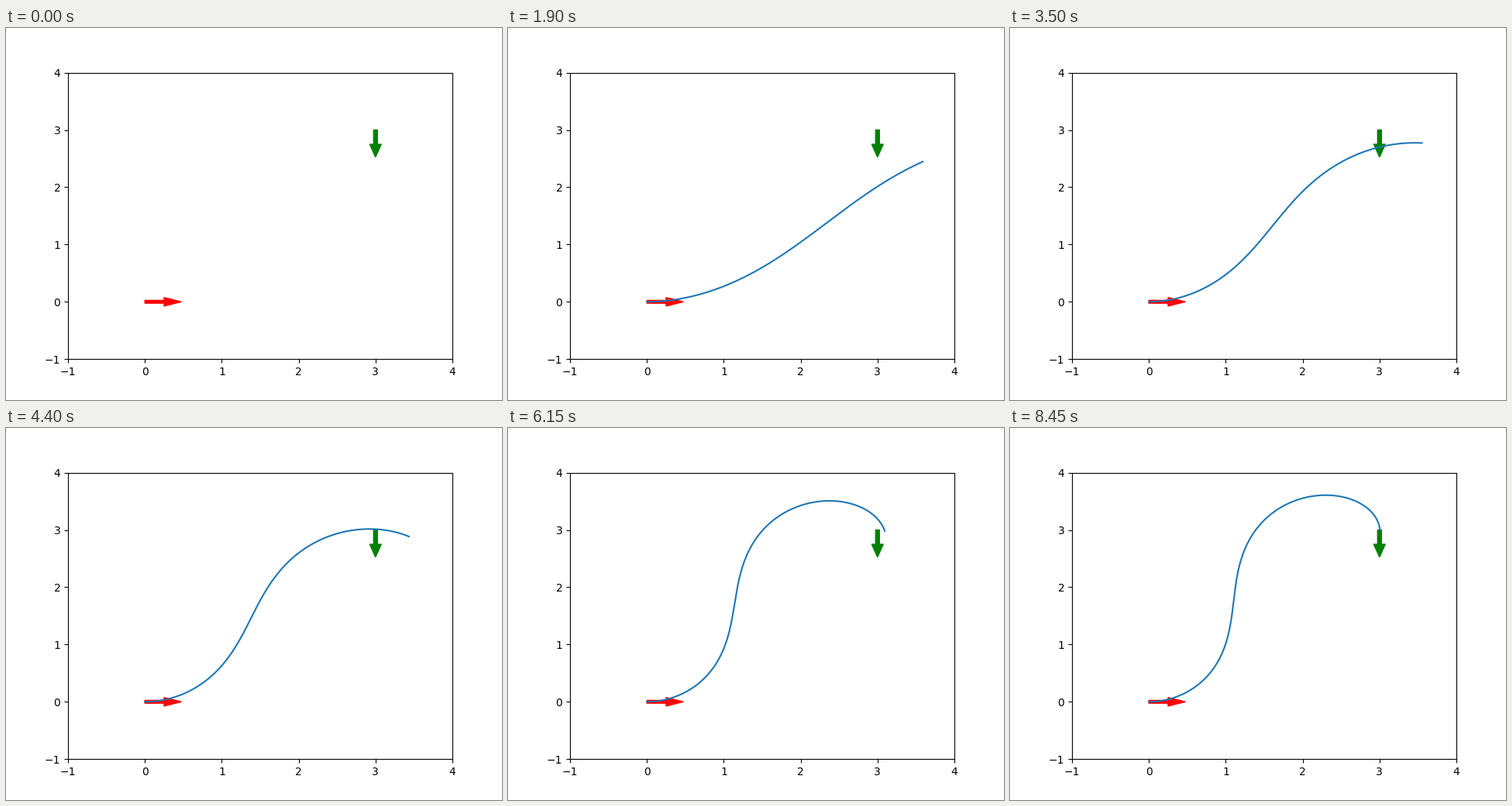
Animation of 640 by 480 pixels, one loop 8.5 s. Source, as a matplotlib script:

```python
import numpy as np
import matplotlib.pyplot as plt
from matplotlib.animation import FuncAnimation

FRAMES, INTERVAL = 170, 50
START_LENGTH = 4.24       # straight first guess
BEND, SETTLE = 0.061, 0.066   # convergence rates per step

T = np.linspace(0, 1, 301)
BASIS = T[:, None] ** np.arange(1, 5)

# step: points along the path, the last one its end, and the end heading
POSES = {
    24: ([(1, .22), (2.5, 1.29), (3, 1.75), (3.643, 2.31)], .66),
    52: ([(1, .345), (2, 1.35), (3, 2.31), (3.58, 2.6)], .32),
    88: ([(1, .613), (1.45, 1.66), (2.96, 3.01), (3.435, 2.885)], -.52),
    108: ([(1, .81), (1.265, 1.94), (2.54, 3.34), (3.208, 2.965)], -.95),
}
GOAL = ([(1, 1), (1.095, 1.8), (2.28, 3.605), (3, 3)], -np.pi / 2)


def path(p):
    """Integrate a polynomial heading; p = [length, c1, c2, c3, c4]."""
    heading = BASIS @ p[1:]
    d = np.column_stack([np.cos(heading), np.sin(heading)])
    steps = (d[1:] + d[:-1]) / 2 * p[0] * T[1]
    return np.vstack([[0, 0], np.cumsum(steps, axis=0)]), d


def error(p, pts, near, heading):
    """Sideways misses, end miss, end heading and a weak smoothness term."""
    curve, d = path(p)
    miss = pts - curve[near]
    side = miss[:, 1] * d[near, 0] - miss[:, 0] * d[near, 1]
    return np.r_[side[:-1], 3 * miss[-1], 0.3 * (heading - p[1:].sum()),
                 0.003 * p[3:]]


def fit(points, heading, eps=1e-5):
    """Gauss-Newton fit, started from a clothoid through the points."""
    pts = np.array(points, float)
    chords = np.diff(np.vstack([[0, 0], pts]), axis=0)
    size = np.hypot(*chords.T)
    mid = (np.cumsum(size) - size / 2) / size.sum()
    angles = np.arctan2(chords[:, 1], chords[:, 0])
    coef = np.linalg.lstsq(mid[:, None] ** [1, 2], angles, rcond=None)[0]
    p = np.r_[size.sum() * 1.03, coef, 0, 0]
    for _ in range(40):
        curve, _d = path(p)
        near = np.argmin(((pts[:, None] - curve) ** 2).sum(axis=2), axis=1)
        near[-1] = len(T) - 1
        base = error(p, pts, near, heading)
        jac = np.column_stack([(error(p + eps * e, pts, near, heading) - base) / eps
                               for e in np.eye(len(p))])
        p = p - 0.7 * np.linalg.lstsq(jac, base, rcond=None)[0]
    return p


steps = list(POSES)
first, last = steps[0], steps[-1]
fitted = np.array([fit(*pose) for pose in POSES.values()])
goal = fit(*GOAL)
drift = np.polyfit(np.array(steps) / last, fitted, 3)


def params(n):
    """Bend quickly from a straight line, drift, then settle on the goal."""
    if n < first:
        bend = (1 - np.exp(-BEND * n)) / (1 - np.exp(-BEND * first))
        length = START_LENGTH + (fitted[0, 0] - START_LENGTH) * n / first
        return np.r_[length, bend * fitted[0, 1:]]
    if n < last:
        return (n / last) ** np.arange(3, -1, -1) @ drift
    return goal + (fitted[-1] - goal) * np.exp(-SETTLE * (n - last))


fig, ax = plt.subplots(figsize=(6.4, 4.8), dpi=100)
ax.set_xlim(-1, 4)
ax.set_ylim(-1, 4)
ax.arrow(0, 0, 0.25, 0, width=0.05, color="r")
ax.arrow(3, 3, 0, -0.25, width=0.05, color="g")
line, = ax.plot([], [])


def update(n):
    if n == 0:
        line.set_data([], [])
    else:
        line.set_data(*path(params(n))[0].T)
    return line,


anim = FuncAnimation(fig, update, frames=FRAMES, interval=INTERVAL,
                     repeat=True, repeat_delay=0)
plt.show()
```
